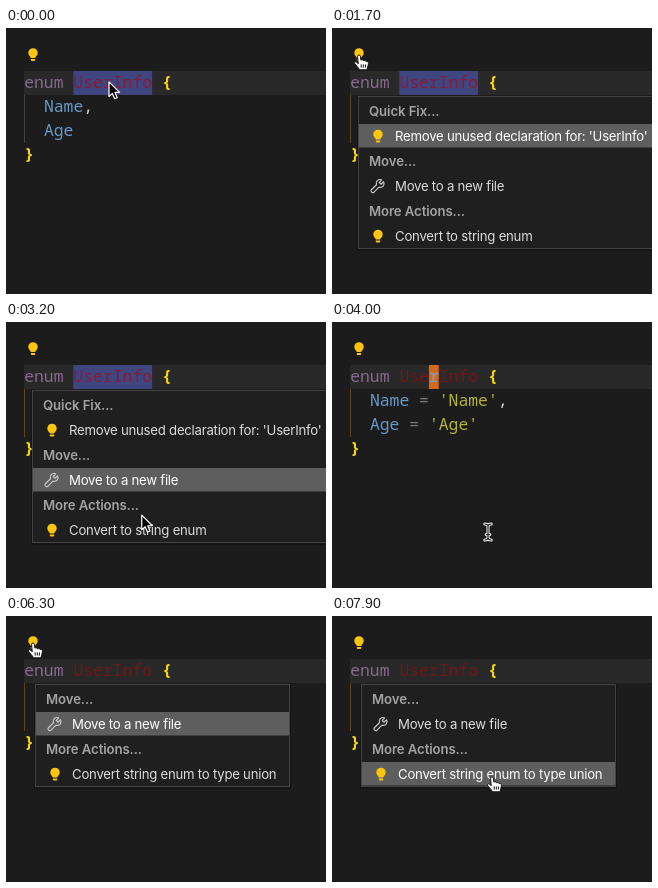
Recreate the animation shown at these times as an HTML page. Size 320 by 266 pixels, loop 8 s.

```html
<!DOCTYPE html>
<html lang="en">
<head>
<meta charset="utf-8">
<title>Enum refactoring</title>
<style>
  html, body { margin: 0; width: 100%; height: 100%; overflow: hidden; background: #1c1c1c; }
  svg { display: block; width: 320px; height: 266px; }
  text { white-space: pre; }
  .code { font: 500 16.4px "Noto Sans Mono", "DejaVu Sans Mono", monospace; }
  .brace { font-weight: 700; }
  .item { font: 13.2px Inter, "Liberation Sans", sans-serif; letter-spacing: -.25px; fill: #dcdcdc; }
  .head { font: 600 13.2px Inter, "Liberation Sans", sans-serif; letter-spacing: -.1px; fill: #a3a3a3; }
</style>
</head>
<body>
<svg id="stage" viewBox="0 0 320 266">
  <defs>
    <g id="bulb" fill="#fdc50c">
      <path d="M-2.2 3.6C-2.2 2-4.7 1.2-4.7-1.6A4.7 4.7 0 0 1 4.7-1.6C4.7 1.2 2.2 2 2.2 3.6Z"/>
      <path d="M-2.2 4.4H2.2V5.6Q2.2 6.6 1.2 6.6H-1.2Q-2.2 6.6-2.2 5.6Z"/>
    </g>
    <path id="wrench" fill="none" stroke="#c8c8c8" stroke-width="1.2" stroke-linejoin="round"
      d="M5.6-4.2 3-1.8 1.2-3.4 3.6-6.2C0-7.4-2.6-4.4-1.5-1.2L-6.6 3.7C-8 5.3-5.6 7.7-4 6.2L1 1.2C4.4 2.3 7.2-.8 5.6-4.2Z"/>
    <path id="arrow" fill="#000" stroke="#fff" stroke-width="1.2" stroke-linejoin="round"
      d="M0 .8V15.5L3.4 12.4 5.7 17.7 8.2 16.6 6 11.4H10.6Z"/>
    <path id="stem" fill="none" stroke-linecap="round"
      d="M-3.2-8Q0-8 0-5.6Q0-8 3.2-8M0-5.6V5.6M-3.2 8Q0 8 0 5.6Q0 8 3.2 8M-1.8 2.6H1.8"/>
    <g id="beam">
      <use href="#stem" stroke="#fff" stroke-width="3"/>
      <use href="#stem" stroke="#111" stroke-width="1.1"/>
    </g>
    <g id="hand" stroke="#111" stroke-linejoin="round">
      <path fill="#fff" d="M-1.4 1.2C-1.4-.4 1.2-.4 1.4 1.2L1.9 5.2C2.8 4.4 4.2 4.6 4.5 5.8C5.6 5 6.8 5.5 7.1 6.5C8.4 6 9.5 6.9 9.4 8.4C9.3 10.8 8.4 11.6 8.1 14.8H.4C-.2 12.7-3.1 10.5-4.4 8.4C-5 7-3.3 6.2-2.2 7.3L-.8 8.8Z"/>
      <path fill="none" d="M2.2 9.4V12.6M4.3 9.4V12.6M6.4 9.4V12.6"/>
    </g>
  </defs>
  <g id="scene"></g>
</svg>
<script>
const LOOP = 8000, TICK = 100, CHAR = 9.84, LEFT = 18.2, ROW = 25, TOP = 71;
const scene = document.getElementById('scene');

// pointer stops: time, x, y
const stops = [
  [0, 103, 53], [150, 103, 53], [850, 41, 34], [1100, 41, 34], [1400, 27, 27],
  [1900, 27, 27], [2800, 95, 142], [3400, 150, 210], [3700, 156, 210],
  [4700, 156, 210], [5400, 74, 96], [5900, 27, 27], [6600, 27, 27],
  [7100, 57, 54], [7900, 160, 161], [8000, 160, 161]
];

const head = label => ({ label });
const item = (icon, label) => ({ icon, label });
const menus = [
  { from: 1500, to: 3700, x: 27, width: 340, rows: [
    head('Quick Fix...'), item('bulb', "Remove unused declaration for: 'UserInfo'"),
    head('Move...'), item('wrench', 'Move to a new file'),
    head('More Actions...'), item('bulb', 'Convert to string enum')] },
  { from: 6100, to: LOOP, x: 30, width: 253, rows: [
    head('Move...'), item('wrench', 'Move to a new file'),
    head('More Actions...'), item('bulb', 'Convert string enum to type union')] }
];

const rect = (x, y, w, h, fill, extra = '') =>
  `<rect x="${x}" y="${y}" width="${w}" height="${h}" fill="${fill}" ${extra}/>`;
const use = (id, x, y) => `<use href="#${id}" transform="translate(${x} ${y})"/>`;
const code = (line, col, text, fill, style = '') =>
  `<text class="code ${style}" x="${LEFT + col * CHAR}" y="${60 + line * 24}" fill="${fill}">${text}</text>`;
const brace = (line, col, text) => code(line, col, text, '#ffd60a', 'brace');

function pointerAt(t) {
  const i = stops.findIndex(s => s[0] > t);
  const [t0, x0, y0] = stops[i - 1], [t1, x1, y1] = stops[i];
  const p = (t - t0) / (t1 - t0), e = p * p * (3 - 2 * p);
  return { x: x0 + (x1 - x0) * e, y: y0 + (y1 - y0) * e };
}

function editor(t, menu) {
  const blue = '#6699cc', gray = '#777', green = '#b3b53c';
  const selected = t < 3700, strings = t >= 3800, block = !selected && !menu;
  const nameX = LEFT + 5 * CHAR, blockX = LEFT + 8 * CHAR;
  let out = rect(18, 43, 302, 24, '#292929') + rect(18, 67, 1, 48, t < 500 ? '#404040' : '#57491a');
  if (selected) out += rect(nameX, 43, 8 * CHAR, 24, '#3f467f');
  if (block) out += rect(blockX, 43, CHAR, 24, '#d2691e');
  out += use('bulb', 27, 26.5) + code(0, 0, 'enum', '#87698f') +
    code(0, 5, block ? 'Use Info' : 'UserInfo', selected ? '#851c38' : '#701618') +
    brace(0, 14, '{') + code(1, 2, 'Name', blue) + code(2, 2, 'Age', blue) + brace(3, 0, '}');
  if (block) out += code(0, 8, 'r', '#6aa6e0');
  if (strings) {
    out += code(1, 7, '=', gray) + code(1, 9, "'Name'", green) +
      code(2, 6, '=', gray) + code(2, 8, "'Age'", green);
  }
  return out + code(1, strings ? 15 : 6, ',', '#d4d4d4');
}

function drawMenu({ x, width, rows }, active) {
  const height = rows.length * ROW;
  let out = rect(x - 2, TOP - 2, width + 4, height + 4, '#000', 'opacity=".25"') +
    rect(x - .5, TOP - 2.5, width + 1, height + 2, '#1f1f1f', 'stroke="#444"');
  rows.forEach(({ icon, label }, i) => {
    const y = TOP + i * ROW;
    if (i === active) out += rect(x, y, width, ROW - 1.5, '#5e5e5e');
    if (icon) out += use(icon, x + 19, y + 12);
    out += `<text class="${icon ? 'item' : 'head'}" x="${x + (icon ? 36 : 10)}" y="${y + 16.7}"` +
      `${i === active ? ' style="fill:#fff"' : ''}>${label}</text>`;
  });
  return out;
}

function render(t) {
  const { x, y } = pointerAt(t);
  const menu = menus.find(m => t >= m.from && t < m.to);
  const row = Math.floor((y - TOP) / ROW);
  const overItem = menu && x > menu.x && menu.rows[row]?.icon;
  const overBulb = Math.hypot(x - 27, y - 27) < 9;
  const overSelection = t < 3700 && x > 67 && x < 146 && y > 43 && y < 67;
  const shape = overItem || overBulb ? 'hand' : menu || overSelection ? 'arrow' : 'beam';
  // the last hovered row keeps its highlight while the pointer crosses a header
  const active = overItem ? row : row > 2 && menu ? row - 1 : 1;
  scene.innerHTML = editor(t, menu) + (menu ? drawMenu(menu, active) : '') + use(shape, x, y);
}

let last = -1;
function frame(now) {
  const t = Math.floor(now % LOOP / TICK) * TICK;
  if (t !== last) render(last = t);
  requestAnimationFrame(frame);
}
render(0);
requestAnimationFrame(frame);
</script>
</body>
</html>
```
